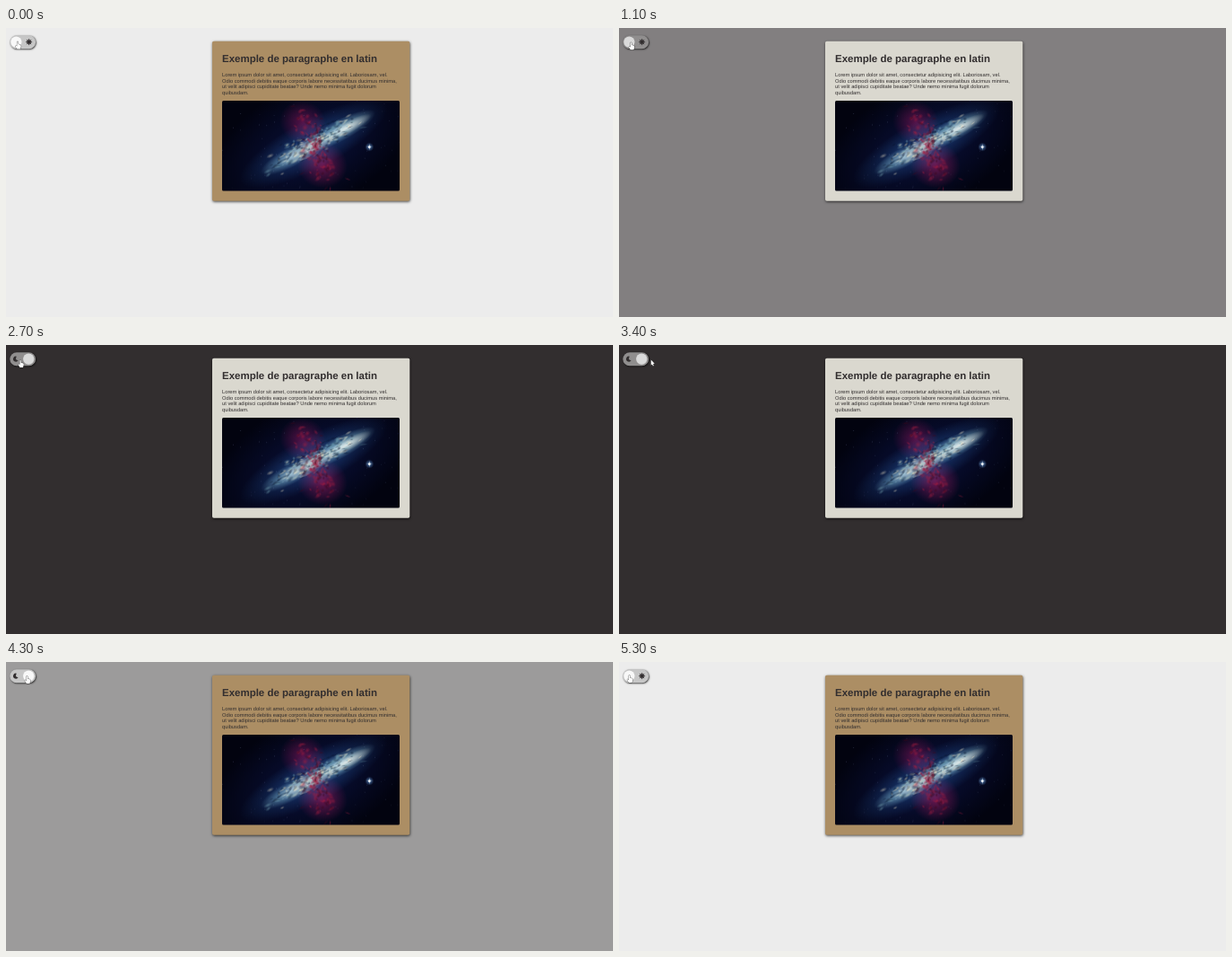
Animation, 677 px wide and 322 px high, one loop 5400 ms. Source, as an HTML page with a canvas:

```html
<!DOCTYPE html>
<html lang="fr">
<head>
<meta charset="utf-8">
<title>Thème clair et sombre</title>
<style>
html, body { margin: 0; width: 100%; height: 100%; overflow: hidden; background: #ececec; }
canvas { display: block; }
</style>
</head>
<body>
<canvas id="stage" width="677" height="322"></canvas>
<script>
const ctx = document.getElementById('stage').getContext('2d');
const LOOP = 5400, STEP = 100;
const TO_DARK = 1000, TO_LIGHT = 4200;
const LIGHT = [236, 236, 236], DARK = [50, 46, 47];
const INK = '#322e2f';
const PHOTO = { x: 241, y: 81, w: 198, h: 100.5 };
const LINES = [
  'Lorem ipsum dolor sit amet, consectetur adipisicing elit. Laboriosam, vel.',
  'Odio commodi debitis eaque corporis labore necessitatibus ducimus minima,',
  'ut velit adipisci cupiditate beatae? Unde nemo minima fugit dolorum',
  'quibusdam.'
];
// time, x, y of the pointer tip
const POINTER = [
  [0, 13, 15.2], [600, 13.3, 15.8], [1900, 13.8, 16.8], [2600, 13.8, 16.8],
  [3100, 35.7, 16.6], [3400, 35.7, 16.6], [3800, 23.4, 15.6],
  [4800, 23.6, 15.9], [5300, 11.6, 14.8], [5400, 11.6, 14.8]
];

const clamp = v => Math.max(0, Math.min(1, v));
const lerp = (a, b, p) => a + (b - a) * p;
const ease = p => p * p * (3 - 2 * p);
const mix = (a, b, p) => `rgb(${a.map((v, i) => Math.round(lerp(v, b[i], p)))})`;

function pill(c, x, y, w, h, r, fill) {
  c.beginPath();
  c.roundRect(x, y, w, h, r);
  c.fillStyle = fill;
  c.fill();
}

function disc(c, x, y, r, fill) {
  c.beginPath();
  c.arc(x, y, r, 0, Math.PI * 2);
  c.fillStyle = fill;
  c.fill();
}

function glow(c, x, y, rx, ry, angle, rgb, alpha) {
  c.save();
  c.translate(x, y);
  c.rotate(angle);
  c.scale(rx, ry);
  const g = c.createRadialGradient(0, 0, 0, 0, 0, 1);
  g.addColorStop(0, `rgba(${rgb},${alpha})`);
  g.addColorStop(0.5, `rgba(${rgb},${alpha * 0.5})`);
  g.addColorStop(1, `rgba(${rgb},0)`);
  disc(c, 0, 0, 1, g);
  c.restore();
}

function makeRandom(seed) {
  return () => (seed = (seed * 16807) % 2147483647) / 2147483647;
}

function paintGalaxy() {
  const art = document.createElement('canvas');
  art.width = 198;
  art.height = 101;
  const c = art.getContext('2d');
  const random = makeRandom(421);
  const spread = () => random() + random() + random() - 1.5;
  const tilt = -0.49;
  c.fillStyle = '#02030f';
  c.fillRect(0, 0, 198, 101);

  c.globalCompositeOperation = 'screen';
  glow(c, 100, 50, 125, 70, tilt, '10,18,62', 0.8);
  glow(c, 102, 48, 92, 28, tilt, '25,65,105', 0.85);
  glow(c, 90, 24, 26, 24, 0.4, '100,8,42', 0.8);
  glow(c, 112, 72, 28, 26, 0.2, '125,14,52', 0.8);
  glow(c, 77, 63, 38, 11, tilt, '110,160,175', 0.9);
  glow(c, 130, 34, 46, 12, tilt, '130,185,195', 0.95);
  glow(c, 138, 31, 32, 7, tilt, '230,225,195', 0.85);
  glow(c, 96, 53, 38, 10, tilt, '235,205,165', 0.75);

  c.globalCompositeOperation = 'source-over';
  for (let i = 0; i < 260; i++) {
    const along = spread() * 50, across = spread() * 11;
    const x = 103 + along * Math.cos(tilt) - across * Math.sin(tilt);
    const y = 47 + along * Math.sin(tilt) + across * Math.cos(tilt);
    const tone = random();
    const rgb = tone < 0.38 ? '6,18,42' : tone < 0.68 ? '130,180,190' : '245,232,200';
    glow(c, x, y, 1.5 + random() * 4, 0.8 + random() * 1.4, tilt + spread() * 0.4, rgb, 0.45);
  }
  for (let i = 0; i < 130; i++) {
    const y = 52 + spread() * 38;
    const x = 103 + (y - 50) * 0.2 + spread() * (9 + Math.abs(y - 50) * 0.4);
    const rgb = random() < 0.7 ? '165,28,62' : '60,5,26';
    glow(c, x, y, 1 + random() * 4, 1 + random() * 2.5, random() * 3, rgb, 0.5);
  }
  for (let i = 0; i < 70; i++) {
    c.fillStyle = `rgba(150,165,210,${0.1 + random() * 0.25})`;
    c.fillRect(random() * 198, random() * 101, 0.8, 0.8);
  }
  glow(c, 164.3, 51.8, 5, 5, 0, '110,170,235', 0.7);
  glow(c, 164.3, 51.8, 4.2, 0.8, 0, '220,240,255', 0.8);
  glow(c, 164.3, 51.8, 0.8, 4.2, 0, '220,240,255', 0.8);
  disc(c, 164.3, 51.8, 1.4, '#fff');
  return art;
}

const galaxy = paintGalaxy();

function drawCard(dark) {
  ctx.save();
  ctx.shadowColor = 'rgba(0,0,0,0.7)';
  ctx.shadowBlur = 3;
  ctx.shadowOffsetX = 0.4;
  ctx.shadowOffsetY = 0.9;
  pill(ctx, 230, 14.8, 220.3, 178, 1.8, dark ? '#dad8cf' : '#ac8e64');
  ctx.restore();

  ctx.textRendering = 'geometricPrecision';
  ctx.fillStyle = INK;
  ctx.font = 'bold 11.49px "Liberation Sans", Arial, sans-serif';
  ctx.fillText('Exemple de paragraphe en latin', 241, 38.4);
  ctx.font = '5.745px "Liberation Sans", Arial, sans-serif';
  LINES.forEach((line, i) => ctx.fillText(line, 241, 54.2 + i * 6.55));

  ctx.save();
  ctx.beginPath();
  ctx.roundRect(PHOTO.x, PHOTO.y, PHOTO.w, PHOTO.h, 1.5);
  ctx.clip();
  ctx.drawImage(galaxy, PHOTO.x, PHOTO.y, PHOTO.w, PHOTO.h);
  ctx.restore();
}

function drawSun(x, y) {
  ctx.strokeStyle = INK;
  ctx.lineWidth = 0.9;
  ctx.beginPath();
  for (let i = 0; i < 4; i++) {
    const dx = Math.cos(i * Math.PI / 4) * 3.5, dy = Math.sin(i * Math.PI / 4) * 3.5;
    ctx.moveTo(x - dx, y - dy);
    ctx.lineTo(x + dx, y + dy);
  }
  ctx.stroke();
  disc(ctx, x, y, 2.4, INK);
}

function drawMoon(x, y) {
  ctx.beginPath();
  ctx.arc(x, y, 3, -1.3, 0.5, true);
  ctx.quadraticCurveTo(x - 1.4, y + 1.2, x + 0.8, y - 2.9);
  ctx.fillStyle = INK;
  ctx.fill();
}

function drawToggle(dark, slide) {
  ctx.save();
  ctx.shadowColor = 'rgba(0,0,0,0.8)';
  ctx.shadowBlur = 2;
  ctx.shadowOffsetX = 0.7;
  ctx.shadowOffsetY = 0.7;
  pill(ctx, 4.3, 8.2, 28.8, 15, 7.5, dark ? '#908e8e' : '#c6c6c6');
  ctx.restore();
  drawMoon(11, 15.6);
  drawSun(25.6, 15.6);
  disc(ctx, lerp(11.4, 25.2, slide), 15.6, 6.1, dark ? '#dadada' : '#f8f8f8');
}

function outline(points, x, y) {
  ctx.beginPath();
  points.forEach(([dx, dy]) => ctx.lineTo(x + dx, y + dy));
  ctx.closePath();
  ctx.fillStyle = '#fff';
  ctx.strokeStyle = '#222';
  ctx.lineWidth = 0.6;
  ctx.lineJoin = 'round';
  ctx.stroke();
  ctx.fill();
}

const HAND = [[-0.6, 0], [0.5, 0], [0.6, 2.9], [3.4, 3.7], [3.7, 5.3], [2.9, 8.2], [-0.6, 8.2], [-2.6, 5], [-1.9, 4.4], [-0.6, 5.3]];
const ARROW = [[0, 0], [0, 5.9], [1.3, 4.8], [2.2, 6.8], [3.1, 6.4], [2.3, 4.4], [4, 4.2]];

function drawPointer(t) {
  const i = POINTER.findIndex(k => k[0] > t);
  const [t0, x0, y0] = POINTER[i - 1], [t1, x1, y1] = POINTER[i];
  const p = ease((t - t0) / (t1 - t0));
  const x = lerp(x0, x1, p);
  outline(x > 33.5 ? ARROW : HAND, x, lerp(y0, y1, p));
}

function draw(t) {
  const dark = t >= TO_DARK && t < TO_LIGHT;
  const since = t - (t >= TO_LIGHT ? TO_LIGHT : TO_DARK);
  const fade = since <= 0 ? 0 : clamp(since / 175);
  const move = clamp((since - 100) / 150);
  const night = t >= TO_LIGHT ? 1 - fade : fade;
  const slide = t >= TO_LIGHT ? 1 - move : move;
  ctx.fillStyle = mix(LIGHT, DARK, night);
  ctx.fillRect(0, 0, 677, 322);
  drawCard(dark);
  drawToggle(dark, slide);
  drawPointer(t);
}

function frame() {
  const t = (performance.now() + 1) % LOOP;
  draw(Math.floor(t / STEP) * STEP);
  requestAnimationFrame(frame);
}
frame();
</script>
</body>
</html>
```
